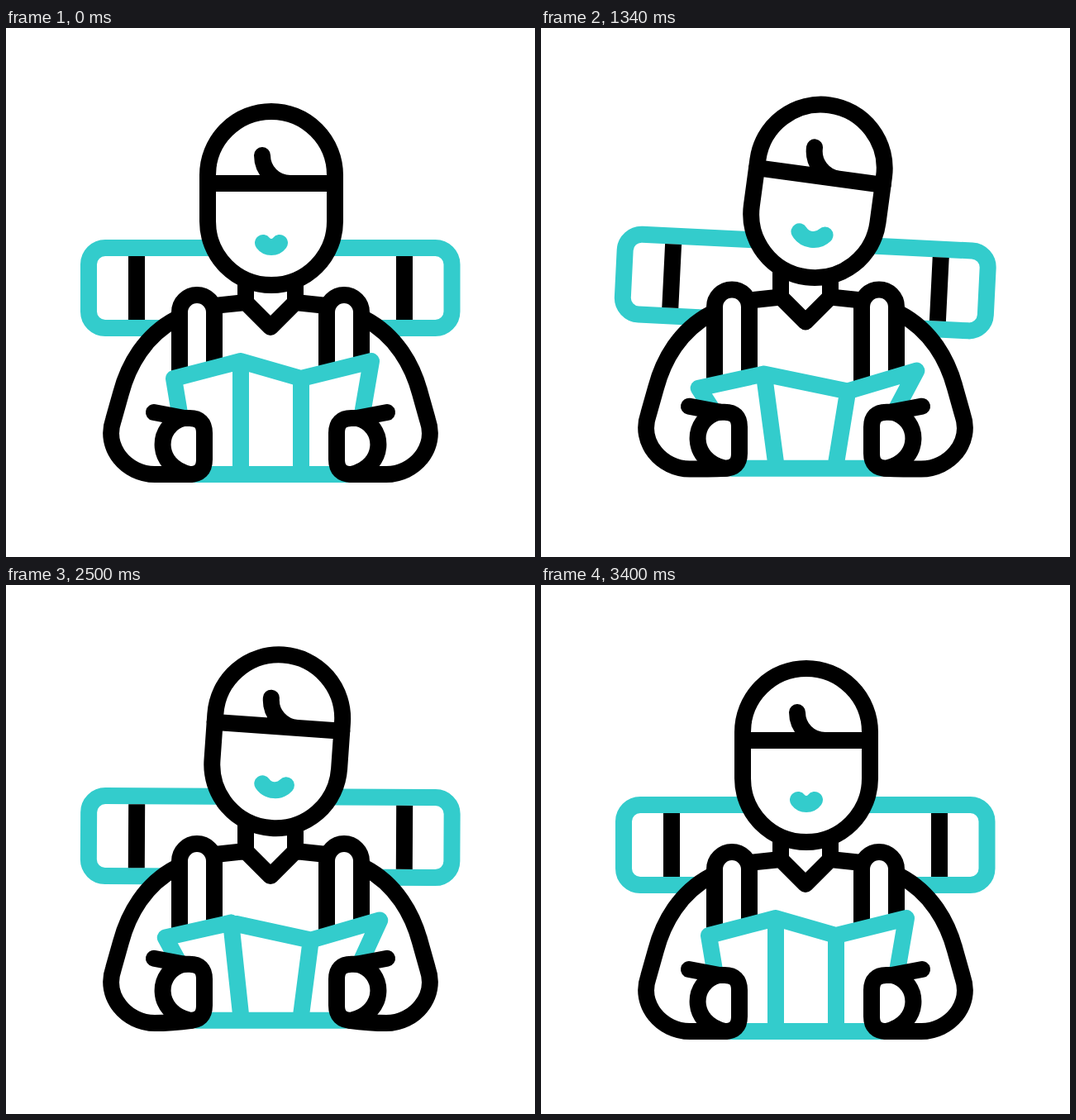
Animation, 640 px wide and 640 px high, one loop 3.6 s. Source, as an HTML page:

```html
<!DOCTYPE html>
<html lang="en">
<head>
<meta charset="utf-8">
<title>Traveller with map</title>
<style>
  html, body { margin: 0; width: 100%; height: 100%; overflow: hidden; background: #fff; }
  svg { display: block; width: 100vw; height: 100vh; }
  path, rect { stroke-width: 20; stroke-linecap: round; stroke-linejoin: round; }
  .k { stroke: #000; }
  .c { stroke: #3cc; }
  .butt { stroke-linecap: butt; }
</style>
</head>
<body>
<svg viewBox="0 0 640 640" fill="none">
  <g id="bag">
    <rect class="c" x="100" y="266" width="439.5" height="97" rx="20" fill="#fff"/>
    <path class="k butt" d="M158 276V353M482 276V353"/>
  </g>

  <g id="body">
    <rect x="206" y="340" width="228" height="150" fill="#fff"/>
    <path class="k" d="M290 300V332L320 362L350 332V300M252 336L290 332M350 332L388 336"/>
    <g class="side">
      <path class="k arm" fill="#fff"/>
      <path class="k butt" fill="#fff" d="M210 448V344A21 21 0 0 1 252 344V448"/>
    </g>
  </g>

  <g id="hold">
    <path id="map" class="c" fill="#fff"/>
    <g class="side">
      <path class="k" fill="#fff" d="M215 472H222Q240 472 240 490V522Q240 540 222 540C179 530 181 480 215 472Z"/>
      <path class="k" d="M179 465L216 472"/>
    </g>
  </g>

  <g id="head">
    <path class="k" fill="#fff" d="M244 178A77 77 0 0 1 398 178V234A77 77 0 0 1 244 234Z"/>
    <path class="k" d="M244 188H398M310 154A34 34 0 0 0 344 188"/>
    <path id="mouth" class="c"/>
  </g>
</svg>
<script>
const LOOP = 3600, HALF = 1600 / 3, SWINGS = 5;
const $ = id => document.getElementById(id);

// The right side of the figure mirrors the left.
document.querySelectorAll('.side').forEach(side => {
  const twin = side.cloneNode(true);
  twin.setAttribute('transform', 'translate(640) scale(-1 1)');
  side.after(twin);
});
const arms = document.querySelectorAll('.arm');

const clamp = (x, max) => Math.min(Math.max(x, 0), max);
const mix = (a, b, p) => a + (b - a) * p;

function ease(x) {
  const p = clamp(x, 1), a = p ** 1.8;
  return a / (a + (1 - p) ** 1.8);
}

// Three rises and falls between 0 and 1.
function bob(t) {
  const x = clamp(t / HALF, 6), i = Math.floor(x), e = ease(x - i);
  return i % 2 ? 1 - e : e;
}

// Swings between 1 and -1, starting from 0 and settling through a small last swing.
function sway(t, first, step, last) {
  const peak = i => i < 0 || i > SWINGS ? 0 : i === SWINGS ? -last : (-1) ** i;
  const i = Math.min(Math.floor((t - first) / step), SWINGS);
  const from = Math.max(first + i * step, 0);
  const to = i === SWINGS ? 3390 : first + (i + 1) * step;
  return mix(peak(i), peak(i + 1), ease((t - from) / (to - from)));
}

// The sheet narrows when closed and spreads and drops when open.
function mapPath(m) {
  const open = Math.max(m, 0), closed = Math.max(-m, 0);
  const half = s => {
    const at = (d, y) => `${320.5 + s * d} ${y}`;
    return {
      corner: at(119.5 + 2 * s - 15 * closed + 13 * open, 413.5 - 10.5 * s + 20 * open),
      fold: at(36.5 + 2 * closed + 15 * open, 413.5 + 10.5 * s + 24 * open),
      foot: at(36.5 + 12 * closed - open, 540),
      edge: at(104 + 11 * closed - 15 * open, 505),
      base: at(90, 540)
    };
  };
  const l = half(-1), r = half(1);
  return `M${l.base}L${l.edge}L${l.corner}L${l.fold}L${r.fold}L${r.corner}L${r.edge}L${r.base}Z` +
    `M${l.fold}L${l.foot}M${r.fold}L${r.foot}`;
}

function draw(t) {
  const body = -12.3 * bob(t), hand = -12 * bob(t - 170), head = body - 13 * bob(t - 88);
  const smile = ease(t / 600) - ease((t - 2240) / 760);
  const put = (id, y, turn = '') => $(id).setAttribute('transform', `translate(0 ${y}) ${turn}`);

  put('bag', body, `rotate(${3.9 * sway(t, 200, 504, .5)} 319.7 314.5)`);
  put('body', body);
  put('hold', body + hand);
  put('head', head, `rotate(${9.6 * sway(t, 210, 508, .13)} 320.5 310)`);

  const arm = `M206 352C168 372 148 408 139 442L130 474C118 508 146 540 180 540Q200 540 225 ${540 + hand}`;
  arms.forEach(a => a.setAttribute('d', arm));
  $('map').setAttribute('d', mapPath(sway(t, 230, 525, 0)));

  const w = mix(10, 15.7, smile), y = mix(260, 257.5, smile), low = y + mix(6.7, 10, smile);
  $('mouth').setAttribute('d',
    `M${321 - w} ${y}C${321 - w / 2} ${low} ${321 + w / 2} ${low} ${321 + w} ${y}`);
}

const start = performance.now();
(function frame() {
  draw((performance.now() - start) % LOOP);
  requestAnimationFrame(frame);
})();
</script>
</body>
</html>
```
